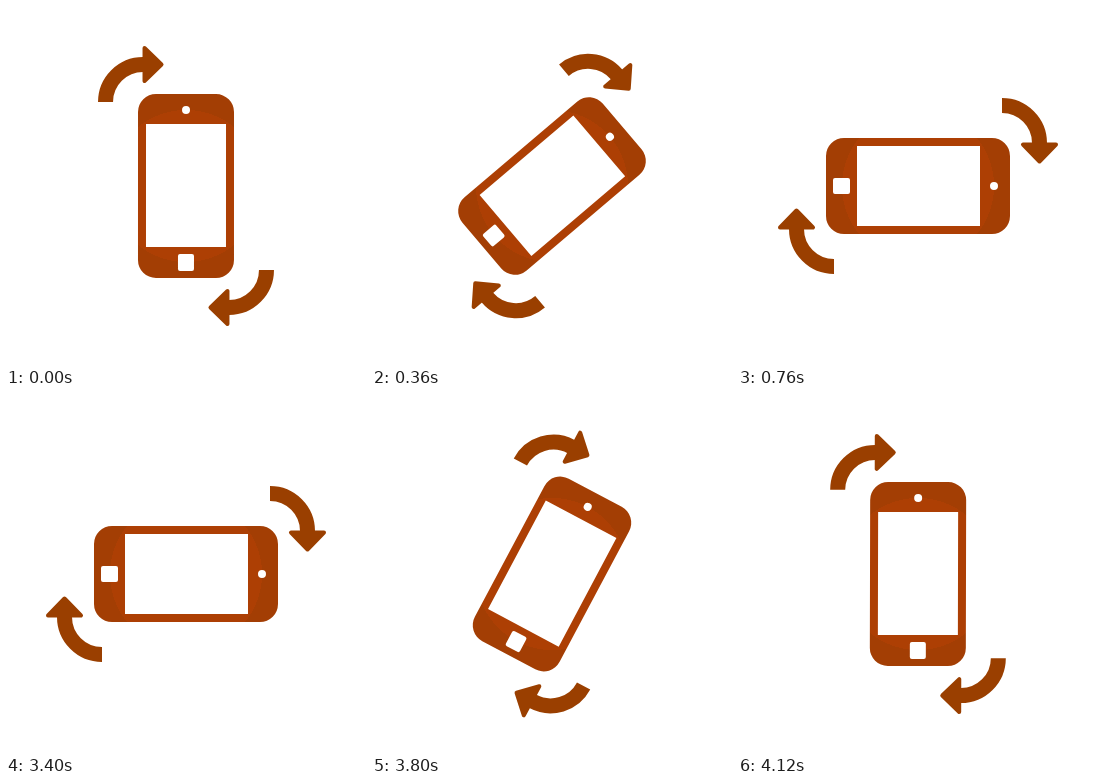
Recreate the animation shown at these times as an HTML page with a canvas. Size 360x360 px, loop 4.16 s.

```html
<!DOCTYPE html>
<html lang="en">
<head>
<meta charset="utf-8">
<title>Rotate your phone</title>
<style>
html, body { margin: 0; width: 100%; height: 100%; overflow: hidden; background: #fff; }
canvas { display: block; width: 360px; height: 360px; }
</style>
</head>
<body>
<canvas id="stage"></canvas>
<script>
const SIZE = 360, MID = SIZE / 2;
const LOOP = 4160, STEP = 40;
const TURN = 757, TURN_START = -11, RETURN_START = 3402;

const canvas = document.getElementById('stage');
const ctx = canvas.getContext('2d');
const ratio = window.devicePixelRatio || 1;
canvas.width = canvas.height = SIZE * ratio;

// Three tones in rings around the centre, darker outwards
const paint = ctx.createRadialGradient(MID, MID, 0, MID, MID, MID);
const ring = (from, to, color) => {
  paint.addColorStop(from / MID, color);
  paint.addColorStop(to / MID, color);
};
ring(0, 76, '#ad3f04');
ring(76, 104, '#a33e04');
ring(104, MID, '#9a3f00');

const bezier = (a, b, s) => 3 * (1 - s) * (1 - s) * s * a + 3 * (1 - s) * s * s * b + s * s * s;

// Strong ease-in-out: cubic-bezier(.77, 0, .175, 1)
function ease(p) {
  if (p <= 0) return 0;
  if (p >= 1) return 1;
  let lo = 0, hi = 1;
  for (let i = 0; i < 24; i++) {
    const s = (lo + hi) / 2;
    if (bezier(0.77, 0.175, s) < p) lo = s; else hi = s;
  }
  return bezier(0, 1, lo);
}

function angleAt(t) {
  const there = ease((t - TURN_START) / TURN);
  const back = ease((t - RETURN_START) / TURN);
  return (there - back) * Math.PI / 2;
}

function drawPhone() {
  ctx.beginPath();
  ctx.roundRect(132, 88, 96, 184, 18);
  ctx.rect(140, 118, 80, 123);
  ctx.roundRect(172, 248, 16, 17, 2);
  ctx.moveTo(184, 104);
  ctx.arc(180, 104, 4, 0, Math.PI * 2);
  ctx.fill('evenodd');
}

function drawArrow() {
  ctx.lineWidth = 15;
  ctx.beginPath();
  ctx.arc(137, 96, 37.5, Math.PI, Math.PI * 1.5);
  ctx.lineTo(139, 58.5);
  ctx.stroke();

  ctx.lineWidth = 4;
  ctx.lineJoin = 'round';
  ctx.beginPath();
  ctx.moveTo(138.5, 42);
  ctx.lineTo(155.5, 58.5);
  ctx.lineTo(138.5, 75);
  ctx.closePath();
  ctx.fill();
  ctx.stroke();
}

function rotate(angle) {
  ctx.translate(MID, MID);
  ctx.rotate(angle);
  ctx.translate(-MID, -MID);
}

function draw(t) {
  ctx.setTransform(ratio, 0, 0, ratio, 0, 0);
  ctx.fillStyle = '#fff';
  ctx.fillRect(0, 0, SIZE, SIZE);
  ctx.fillStyle = ctx.strokeStyle = paint;
  rotate(angleAt(t));
  drawPhone();
  drawArrow();
  rotate(Math.PI);
  drawArrow();
}

const start = performance.now();

function tick() {
  const t = Math.max(0, performance.now() - start) % LOOP;
  draw(Math.floor(t / STEP) * STEP);
  requestAnimationFrame(tick);
}
tick();
</script>
</body>
</html>
```
